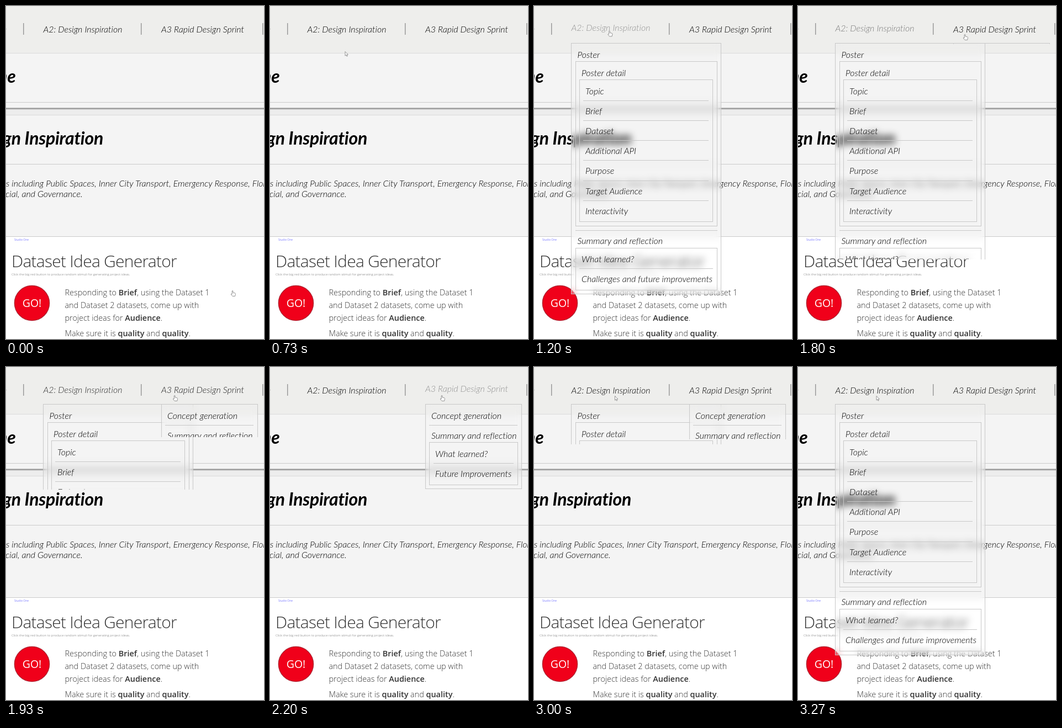
An HTML page that plays this animation: 467 px wide and 603 px high, repeating every 3.67 s.

```html
<!DOCTYPE html>
<html lang="en">
<head>
<meta charset="utf-8">
<title>Design menus</title>
<style>
  html, body { margin: 0; width: 100%; height: 100%; overflow: hidden; background: #fff; }
  svg { position: absolute; left: 0; top: 0; width: 467px; height: 603px; }
  text { font: italic 300 16px Lato, sans-serif; font-variant-ligatures: none; white-space: pre; }
  text.h { font-weight: 700; font-size: 32px; letter-spacing: -.25px; }
  text.p { font: 300 14.4px "Open Sans", sans-serif; fill: #333; }
  text.p tspan { font-weight: 600; }
  .menu { position: absolute; top: 67px; overflow: hidden; background: rgba(255,255,255,.05); backdrop-filter: blur(6.5px); }
  .menu svg { top: -67px; }
  .menu rect, .menu path { fill: none; stroke: #c8c8c8; }
  #cursor path { fill: #fff; stroke: #8a8a8a; stroke-width: .9; stroke-linejoin: round; }
</style>
</head>
<body>
<svg id="page"></svg>
<div class="menu" id="m1" style="left:67px;width:272px"></div>
<div class="menu" id="m2" style="left:281px;width:175px"></div>
<svg><g id="cursor">
  <path id="arrow" d="M.5 .5V8.2L2.3 6.6L3.5 9.2L4.7 8.7L3.5 6.1H5.9Z"/>
  <path id="hand" d="M-.8 6.8V1Q0 -.2 .9 1V4L4.6 4.9Q5.6 5.3 5.4 6.6L4.6 10.5H0L-2.9 7Q-2.6 5.6 -.8 6.8Z"/>
</g></svg>
<script>
const $ = id => document.getElementById(id);
const text = (x, y, s, attrs = '') => `<text x="${x}" y="${y}" ${attrs}>${s}</text>`;
const fill = (y, h, c) => `<rect y="${y}" width="467" height="${h}" fill="${c}"/>`;
const box = (x, y, x2, y2) => `<rect x="${x + .5}" y="${y + .5}" width="${x2 - x}" height="${y2 - y}"/>`;
const rule = (x, x2, y) => `<path d="M${x} ${y + .5}H${x2}"/>`;
const end = 'text-anchor="end"';

$('page').innerHTML =
  fill(0, 85, '#eeeeec') + fill(85, 1, '#dcdcdc') + fill(86, 332, '#f4f4f4') +
  fill(174, 1, '#cbcbcb') + fill(184, 1, '#c4c4c4') + fill(185, 1, '#929292') +
  fill(186, 1, '#b0b0b0') + fill(187, 1, '#d8d8d8') + fill(188, 9, '#ededed') + fill(197, 1, '#dadada') +
  fill(286, 1, '#cbcbcb') + fill(417, 1, '#cbcbcb') + fill(418, 185, '#fff') +
  [31, 244, 464].map(x => `<rect x="${x}" y="31" width="1.5" height="21" fill="#999"/>`).join('') +
  text(1, 48, 'Home', end) +
  text(67.5, 48, 'A2: Design Inspiration', 'id="a2"') +
  text(281, 48, 'A3 Rapid Design Sprint', 'id="a3"') +
  text(17.5, 139, 'Home', end + ' class="h"') +
  text(176, 251, 'A2: Design Inspiration', end + ' class="h"') +
  text(0, 327, 's including Public Spaces, Inner City Transport, Emergency Response, Flora') +
  text(-1, 346, 'cial, and Governance.') +
  text(15, 424.5, 'Studio One', 'class="p" style="font-size:5.2px;fill:#33f"') +
  text(10, 473, 'Dataset Idea Generator', 'class="p" style="font-size:30px;letter-spacing:-.75px"') +
  text(10, 488, 'Click the big red button to produce random stimuli for generating project ideas.',
    'class="p" style="font-size:6.05px;fill:#666"') +
  '<circle cx="47" cy="538" r="31.6" fill="#f0001a" stroke="#b02030" stroke-width="1.4"/>' +
  text(47, 545, 'GO!', 'class="p" text-anchor="middle" style="font-size:19.5px;font-weight:400;fill:#fff"') +
  [['Responding to <tspan>Brief</tspan>, using the Dataset 1', 524],
   ['and Dataset 2 datasets, come up with', 547],
   ['project ideas for <tspan>Audience</tspan>.', 570],
   ['Make sure it is <tspan>quality</tspan> and <tspan>quality</tspan>.', 598]]
    .map(([s, y]) => text(106.5, y, s, 'class="p"')).join('');

const topics = ['Topic', 'Brief', 'Dataset', 'Additional API', 'Purpose', 'Target Audience', 'Interactivity'];
const fillMenu = (id, left, body) => $(id).innerHTML = `<svg style="left:${-left}px">${body}</svg>`;

fillMenu('m1', 67,
  box(67, 67, 338, 521) + text(78.5, 93.5, 'Poster') +
  box(75, 100, 331, 398) + text(86, 127, 'Poster detail') +
  box(82, 133, 323, 390) +
  topics.map((s, i) => text(93, 160 + i * 36.1, s) +
    (i ? rule(89, 316, Math.round(135 + i * 36.1)) : '')).join('') +
  rule(75, 332, 406) + text(78.5, 431, 'Summary and reflection') +
  box(75, 438, 331, 514) + text(86, 464, 'What learned?') +
  rule(82, 324, 475) + text(86, 500, 'Challenges and future improvements'));

fillMenu('m2', 281,
  box(281, 67, 455, 220) + text(292, 93.5, 'Concept generation') +
  rule(288, 448, 105) + text(292, 130, 'Summary and reflection') +
  box(288, 136, 448, 213) + text(299, 163, 'What learned?') +
  rule(296, 441, 174) + text(299, 199, 'Future Improvements'));

const LOOP = 3670, STEP = 1000 / 15, SLIDE = 370;
const swing = p => .5 - Math.cos(Math.PI * Math.min(1, Math.max(0, p))) / 2;

// 0..1 amount that turns on and off by turns at the given times
const toggle = (t, ...times) =>
  times.reduce((sum, at, i) => sum + (i % 2 ? -1 : 1) * swing((t - at) / SLIDE), 0);

// time, x, y of the pointer tip
const route = [[0, 410, 515], [530, 135, 119], [730, 135.5, 82], [1130, 136.5, 44.5], [1610, 136.5, 44.5],
  [1800, 302, 51], [2130, 311, 51], [2470, 311, 51], [2790, 272, 51], [3000, 146, 52], [3260, 141.5, 52]];

function pointer(t) {
  let i = 1;
  while (i < route.length - 1 && t > route[i][0]) i++;
  const [t0, x0, y0] = route[i - 1], [t1, x1, y1] = route[i];
  const p = swing((t - t0) / (t1 - t0));
  return [x0 + (x1 - x0) * p, y0 + (y1 - y0) * p];
}

function hover(id, k) {
  const c = 146 * k;
  $(id).setAttribute('y', 48 - 3 * k);
  $(id).setAttribute('fill', `rgb(${c},${c},${c})`);
}

function draw(now) {
  const t = Math.floor((now % LOOP + 5) / STEP) * STEP;
  $('m1').style.height = Math.round(455 * toggle(t, 750, 1710, 2903)) + 'px';
  $('m2').style.height = Math.round(154 * toggle(t, 1775, 2795)) + 'px';
  hover('a2', toggle(t, 825, 1700));
  hover('a3', toggle(t, 1820, 2540));
  const [x, y] = pointer(t);
  const hand = y > 418 || t > 800 && t < 1700 || t > 1790 && t < 2600;
  $('cursor').setAttribute('transform', `translate(${x} ${y})`);
  $('hand').style.display = hand ? '' : 'none';
  $('arrow').style.display = hand ? 'none' : '';
}

let start;
function tick(now) {
  start ??= now;
  draw(now - start);
  requestAnimationFrame(tick);
}
draw(0);
requestAnimationFrame(tick);
</script>
</body>
</html>
```
